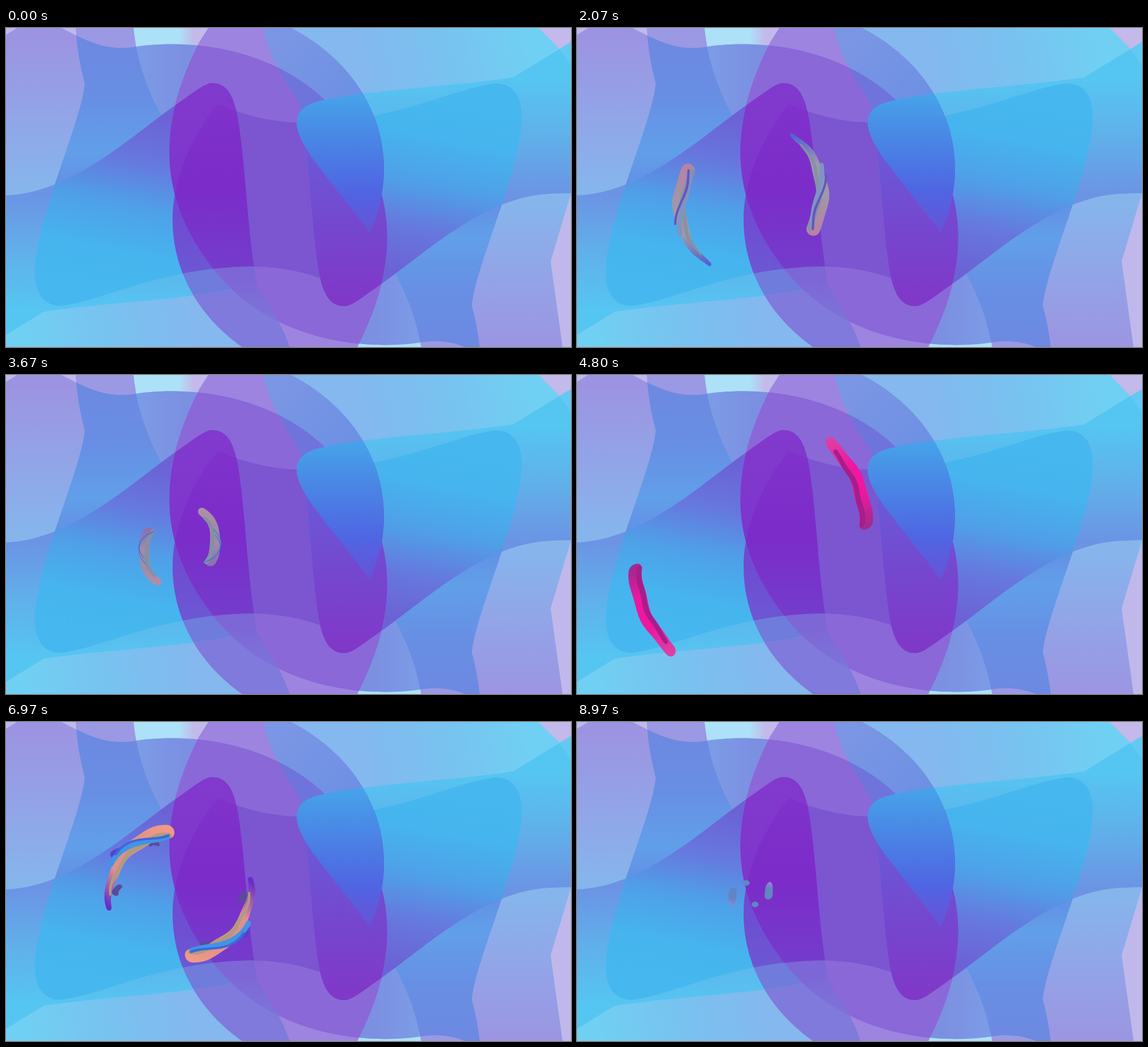
An HTML page with a canvas for the animation above (9010 ms loop, 997 by 562 pixels).

```html
<!DOCTYPE html>
<html lang="en">
<head>
<meta charset="utf-8">
<title>Spiral swimmers</title>
<style>
  html, body { margin: 0; width: 100%; height: 100%; overflow: hidden; }
  canvas { display: block; }
</style>
</head>
<body>
<canvas id="stage" width="997" height="562"></canvas>
<script>
const W = 997, H = 562, LOOP = 9010, CYCLE = 4505;
const ctx = document.getElementById('stage').getContext('2d');

// ---------- backdrop: four shapes and their half-turn copies ----------

const halfTurn = new DOMMatrix([-1, 0, 0, -1, 961, 587]);
const turned = path => {
  const copy = new Path2D();
  copy.addPath(path, halfTurn);
  return copy;
};

// Lower case is the half-turn copy of the upper case shape.
const shapes = {
  p: new Path2D('M98 0C150 27 180 41 230 33C280 25 455 14 576 140C692 270 700 405 620 562L604 587 300 660 21 587 -14 552 -36 522 -36 296 0 176 -21 25 60 -25Z'),
  Q: new Path2D('M-60 297L0 295C120 290 220 190 310 128C340 107 352 97 364 97C400 97 408 140 415 200C425 290 428 370 443 453C470 500 495 530 508 590L-60 640Z'),
  R: new Path2D('M118 -60L123 0Q126 50 139 98C132 170 51 340 51 430C50 470 70 492 100 489C170 480 260 430 400 421C470 416 530 428 587 453C640 390 667 310 667 250C667 110 560 10 440 -25Z'),
  S: new Path2D('M215 -60L225 0C240 150 340 250 416 352C470 425 450 450 400 460C320 478 160 485 66 500L-40 565 -80 560 -80 -60Z')
};
shapes.P = turned(shapes.p);
for (const key of 'QRS') shapes[key.toLowerCase()] = turned(shapes[key]);

// Fills the intersection of the named shapes with a gradient along a line.
function fillShared(g, names, colours, [x0, y0, x1, y1] = [0, 0, 0, H], turn = false) {
  g.save();
  if (turn) g.setTransform(halfTurn);
  for (const name of names) g.clip(shapes[name]);
  const fill = g.createLinearGradient(x0, y0, x1, y1), stops = colours.split(' ');
  stops.forEach((c, i) => fill.addColorStop(i / Math.max(1, stops.length - 1), c));
  g.fillStyle = fill;
  g.fillRect(-50, -50, W + 100, H + 100);
  g.restore();
}

function makeBackdrop() {
  const canvas = document.createElement('canvas');
  canvas.width = W;
  canvas.height = H;
  const g = canvas.getContext('2d');
  const down = (y0, y1) => [0, y0, 0, y1];
  const single = (...layer) => fillShared(g, ...layer);
  const both = (names, colours, line) => {
    single(names, colours, line);
    single(names, colours, line, true);
  };
  single('', '#ace1f7 #c3b9ea', [305, 0, 332, 0]);
  single('r', '#ace1f7');
  both('S', '#c0b8eb #62c9f3', down(250, 520));
  both('p', '#70d0f3 #78c2f0 #84b8ee', [30, 540, 330, 480]);
  both('Sp', '#9c94e2 #92a4e7 #86b5ec', down(20, 280));
  single('RSP', '#7189e0');
  both('RS', '#9b98e4');
  both('Rp', '#7c9ce6 #7c90e2', [230, 60, 310, 60]);
  both('RSp', '#6d89e1 #678fe4 #619fe9 #6488e2', down(30, 310));
  both('RP', '#9c84e0');
  single('RPq', '#7b96e4 #6b8fe4', [500, 0, 640, 140]);
  single('rpQ', '#7f7adb');
  both('QSp', '#6c93e4 #60b0ea #55c6f2', down(290, 500));
  both('QRp', '#6c62d6 #6678de #4fa0e8 #46b4ee #46b8ef', [230, 150, 170, 470]);
  both('QrpS', '#6f7cdc');
  both('QRrp', '#7046d0 #6c58d4', down(280, 440));
  both('Pp', '#8a68d8');
  both('PpRr', '#7b56d0');
  single('QPp', '#7d66d6 #7c78da', down(440, 540));
  single('QPpR', '#8239cd #7d36cc #7040cd', down(100, 440));
  single('QPpRr', '#8032cb #7b2cc9 #733ecc', down(130, 440));
  single('qPp', '#6e74dc');
  single('qPpr', '#6a5cd8 #7448cf #8038c8', down(200, 480));
  single('sR', '#46a4ea #4a84e5 #4f66e3 #6a50d6', down(115, 370));
  return canvas;
}
const backdrop = makeBackdrop();

// ---------- swimmers on an inward spiral ----------

const lerp = (a, b, k) => a + (b - a) * k;
const clamp = v => Math.min(1, Math.max(0, v));
const bell = (t, centre, width) => Math.exp(-(((t - centre) / width) ** 2));
const rgb = hex => [1, 3, 5].map(i => parseInt(hex.slice(i, i + 2), 16));
const mix = (a, b, k) => {
  const to = rgb(b);
  return 'rgb(' + rgb(a).map((v, i) => Math.round(lerp(v, to[i], k))) + ')';
};

// Finds the two keys around t and how far t lies between them.
function between(keys, t) {
  let i = 0;
  while (i < keys.length - 2 && t > keys[i + 1].at) i++;
  const [a, b] = [keys[i], keys[i + 1]];
  return [a, b, clamp((t - a.at) / (b.at - a.at))];
}

const radius = deg => 156 - .172 * deg + 72 / (1 + Math.exp((deg - 10) / 28));

const headKeys = [
  { at: 165, deg: -20 }, { at: 295, deg: -5 }, { at: 1165, deg: 80 },
  { at: 1370, deg: 109 }, { at: 2465, deg: 268 }, { at: 2700, deg: 325 }, { at: 4465, deg: 793 }
];

// Colours: tail, middle, head, shade, stripe, stripe edge.
const looks = [
  { at: 600, colours: '#dc3fa5 #ef179f #a32a8f #a81d8a #f0957f #c0626f' },
  { at: 1165, colours: '#6a86c8 #1fb4ea #25b0d8 #2bb6ee #f0957f #c0626f' },
  { at: 1370, colours: '#2fc0ea #25a8dc #4f58de #3a82e6 #f0957f #b8308c' },
  { at: 2465, colours: '#6a2ac8 #e0908c #f29a84 #b39a7c #3d94ea #3a6ad8' },
  { at: 2700, colours: '#c0a07c #ee937f #c45a9c #b39a80 #3f86e6 #5522dc' },
  { at: 4465, colours: '#9a80d0 #5f86c4 #5f86c4 #5f86c4 #5f86c4 #5f86c4' }
];

function drawSwimmer(t, turn) {
  const [k0, k1, kHead] = between(headKeys, t);
  const head = lerp(k0.deg, k1.deg, kHead);
  const tail = Math.max(-59, head - Math.min(100, 47 + .024 * (t - 295)));
  const length = radius((tail + head) / 2) * (head - tail) * Math.PI / 180;

  const [l0, l1, kLook] = between(looks, t), next = l1.colours.split(' ');
  const [tailColour, midColour, headColour, shade, stripe, stripeEdge] =
    l0.colours.split(' ').map((c, i) => mix(c, next[i], kLook));

  const point = (u, off) => {
    const deg = lerp(tail, head, u), a = deg * Math.PI / 180 + turn, r = radius(deg) + off;
    return [306.5 + r * Math.cos(a), 302.5 + r * Math.sin(a)];
  };

  // Band with rounded ends between two places along the body.
  function band(u0, u1, offset, half, fill) {
    const left = [], right = [], n = 40, size = (u1 - u0) * length;
    for (let i = 0; i <= n; i++) {
      const s = .5 - .5 * Math.cos(Math.PI * i / n), u = lerp(u0, u1, s), h = half(s), o = offset(s);
      const edge = clamp(Math.min(s, 1 - s) * size / (h + .01));
      const w = h * Math.sqrt(1 - (1 - edge) ** 2);
      left.push(point(u, o + w));
      right.unshift(point(u, o - w));
    }
    ctx.beginPath();
    for (const p of left.concat(right)) ctx.lineTo(...p);
    ctx.closePath();
    ctx.fillStyle = fill;
    ctx.fill();
  }

  // Fins sit on alternate sides and slip back towards the tail.
  function fins(from, centre, to, first, colours) {
    if (t < from || t > to) return;
    colours.split(' ').forEach((colour, i) => {
      const u = Math.max(-.12, first + .3 * i - (t - centre) / 480), wide = 11 / length;
      const side = i % 2 ? 13 : -14;
      if (u < 1) band(u - wide, u + wide, s => side + 3 * Math.sin(5 * s), () => 6, colour);
    });
  }
  fins(800, 1165, 1750, .85, '#a8ec3c #68b868');
  fins(2150, 2465, 3000, .13, '#5b4a9c #5a40cc #5b4a9c');

  const headHalf = 12 + 5 * bell(t, 1250, 450) - Math.max(0, (t - 2700) / 350);
  const taper = t < 1300 ? 1 - t / 1300 : (t - 1300) / 3165;
  const end = 1 - .5 * clamp((t - 3600) / 865);
  const bodyHalf = s => headHalf * lerp(taper, 1, Math.min(1, s / .65) ** .9);
  const sway = s => 1.5 * Math.sin(s * length / 12 + t / 200);
  const fill = ctx.createLinearGradient(...point(0, 0), ...point(end, 0));
  [tailColour, midColour, midColour, headColour].forEach((c, i) => fill.addColorStop(.03 + .31 * i, c));
  band(0, end, sway, bodyHalf, fill);
  if (end > .6) band(.12, .97, s => sway(s) - bodyHalf(s) * .55, s => bodyHalf(s) * .4, shade);

  const stripeHalf = 4.5 * clamp((t - 700) / 300) * clamp((3900 - t) / 1000);
  if (stripeHalf > .2) {
    const wave = s => .9 * headHalf * Math.cos(1.3 * Math.PI * s + Math.PI * (t - 1165) / 217);
    band(.35, .95, wave, () => stripeHalf, stripe);
    band(.45, .95, s => wave(s) + stripeHalf / 2, () => stripeHalf / 2, stripeEdge);
  }
  if (t > 3900) {
    ctx.beginPath();
    ctx.ellipse(...point(1, 0), 6, 5, 0, 0, 7);
    ctx.fillStyle = headColour;
    ctx.fill();
  }
}

// The motion advances in 50 ms steps, with a short or long step between groups.
function stepped(ms) {
  if (ms < 170) return 0;
  const c = (ms - 170) % 1900, group = c < 930 ? 0 : 930;
  return ms - c + group + 50 * Math.min(18, Math.floor((c - group) / 50)) - 170 + 170;
}

const start = performance.now();
function frame() {
  const t = stepped((performance.now() - start) % LOOP) % CYCLE;
  ctx.drawImage(backdrop, 0, 0);
  if (t >= 160 && t < 4468) {
    drawSwimmer(t, 0);
    drawSwimmer(t, Math.PI);
  }
  requestAnimationFrame(frame);
}
frame();
</script>
</body>
</html>
```
